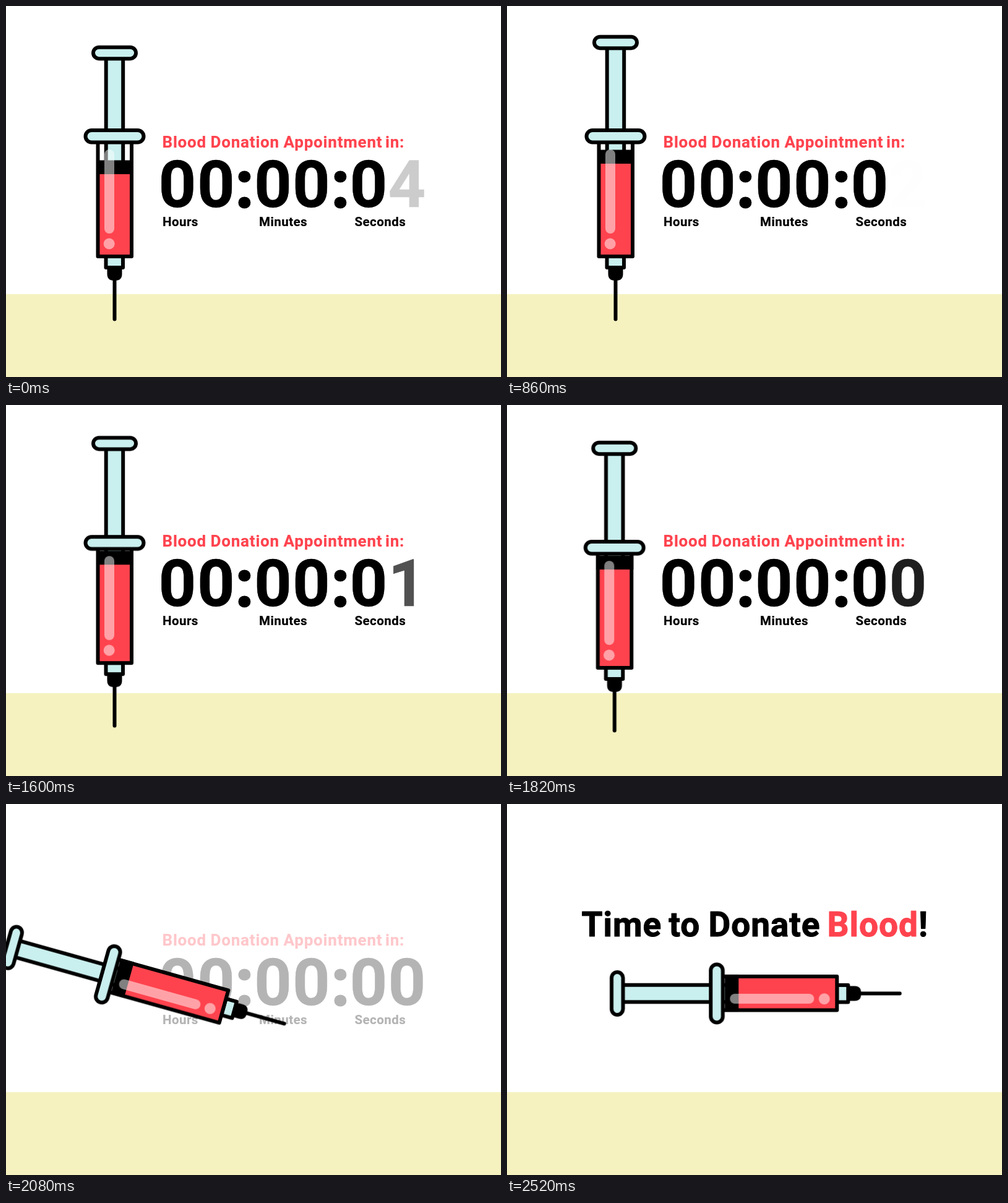
Write an HTML page that moves like this. It is 800 px wide and 600 px high and loops after 2820 ms.

```html
<!DOCTYPE html>
<html lang="en">
<head>
<meta charset="utf-8">
<title>Blood donation countdown</title>
<style>
  html, body { margin: 0; width: 100%; height: 100%; overflow: hidden; background: #fff; }
  svg { display: block; width: 800px; height: 600px; }
  text { font-family: Roboto, Arial, sans-serif; font-weight: 700; fill: #000; stroke: #000; stroke-linejoin: round; }
  .red { fill: #ff434e; stroke: #ff434e; }
  .head { font-size: 26px; letter-spacing: .8px; stroke-width: .2px; }
  .label { font-size: 20.5px; letter-spacing: .45px; stroke-width: .2px; }
  .clock { font-size: 106px; text-anchor: middle; stroke-width: .5px; }
  .colon { stroke-width: 3px; }
  .title { font-size: 55px; letter-spacing: .9px; stroke-width: 1px; }
  .line { stroke: #000; stroke-width: 6px; stroke-linejoin: round; }
  .glass { fill: #c9efee; }
</style>
</head>
<body>
<svg viewBox="0 0 800 600">
  <rect width="800" height="600" fill="#fff"/>
  <rect y="466" width="800" height="134" fill="#f5f2c0"/>

  <g id="countdown">
    <text class="head red" y="228.5"><tspan x="252.5">Blood</tspan> <tspan x="330.5">Donation</tspan> <tspan x="448.5">Appointment</tspan> <tspan x="613">in:</tspan></text>
    <g class="clock">
      <text x="277" y="324.5">0</text>
      <text x="339.5" y="324.5">0</text>
      <text x="385.5" y="324.5" class="colon">:</text>
      <text x="431.5" y="324.5">0</text>
      <text x="493.5" y="324.5">0</text>
      <text x="540.5" y="324.5" class="colon">:</text>
      <text x="586" y="324.5">0</text>
      <g id="digits"></g>
    </g>
    <g class="label">
      <text x="253" y="355.5">Hours</text>
      <text x="409" y="355.5">Minutes</text>
      <text x="563.5" y="355.5">Seconds</text>
    </g>
  </g>

  <text id="title" class="title" y="214"><tspan x="120.5">Time</tspan> <tspan x="261.5">to</tspan> <tspan x="325.5">Donate</tspan> <tspan class="red" x="517.5">Blood</tspan><tspan x="665">!</tspan></text>

  <g id="moveX"><g id="moveY"><g id="turn"><g transform="translate(-175.5 -273)">
    <rect x="172.5" y="436" width="6" height="73.5" rx="3"/>
    <rect class="line glass" x="161.5" y="405" width="27.5" height="18"/>
    <path d="M163.5 421H187.5V433Q187.5 444 177 444H174Q163.5 444 163.5 433Z"/>
    <rect x="148.5" y="222" width="54.5" height="183" fill="#ff434e"/>
    <g id="plunger">
      <rect x="149" y="222" width="53" height="30" fill="#fff"/>
      <rect class="line glass" x="161.7" y="80" width="27.5" height="175"/>
      <rect x="146" y="249.5" width="60" height="22.5"/>
      <rect class="line glass" x="141" y="66.7" width="69" height="18.5" rx="9.25"/>
    </g>
    <path class="line" fill="none" d="M148.5 219V405H203V219"/>
    <rect class="line glass" x="128.5" y="201" width="94" height="19.5" rx="9.75"/>
    <g fill="#fff" opacity=".5">
      <rect x="159" y="232" width="16" height="136" rx="8"/>
      <circle cx="166.7" cy="384.5" r="9"/>
    </g>
  </g></g></g></g>
</svg>
<script>
const LOOP = 2820;
const FADE = 140;
const SMOOTH = 'cubic-bezier(.33,0,.67,1)';
const byId = id => document.getElementById(id);

// Each step is [time, value, easing to the next step].
function track(el, prop, steps, format = v => v) {
  const first = steps[0], last = steps[steps.length - 1];
  const all = [...steps];
  if (first[0] > 0) all.unshift([0, first[1]]);
  if (last[0] < LOOP) all.push([LOOP, last[1]]);
  const frames = all.map(([time, value, easing = 'linear']) =>
    ({ offset: time / LOOP, [prop]: format(value), easing }));
  el.animate(frames, { duration: LOOP, iterations: Infinity });
}

const slide = axis => v => `translate${axis}(${v}px)`;

track(byId('moveX'), 'transform', [
  [1760, 175.5, SMOOTH],
  [1980, 166.4, 'cubic-bezier(.4,.25,.7,.64)'],
  [2160, 287, 'cubic-bezier(.333,.833,.667,1)'],
  [2520, 401.3]
], slide('X'));

track(byId('moveY'), 'transform', [
  [1466, 273, SMOOTH],
  [1754, 300, SMOOTH],
  [1980, 267.3, SMOOTH],
  [2150, 306.4]
], slide('Y'));

track(byId('turn'), 'transform', [
  [1906, 0, 'cubic-bezier(.5,0,.5,1)'],
  [2160, -90]
], v => `rotate(${v}deg)`);

track(byId('plunger'), 'transform', [
  [0, 0], [540, -11.5], [1200, -22.8], [1390, -26]
], slide('Y'));

track(byId('countdown'), 'opacity', [[1940, 1], [2140, 0]]);
track(byId('title'), 'opacity', [[2160, 0], [2334, 1]]);

// Digit, start and end of its stay.
const digits = [[4, -27, 491], [3, 491, 860], [2, 860, 1226], [1, 1226, 1697], [0, 1697, LOOP]];
for (const [digit, start, end] of digits) {
  const el = document.createElementNS('http://www.w3.org/2000/svg', 'text');
  el.setAttribute('x', 648);
  el.setAttribute('y', 324.5);
  el.textContent = digit;
  byId('digits').append(el);
  const steps = start < 0 ? [[0, -start / FADE]] : [[start, 0]];
  steps.push([start + FADE, 1]);
  if (end < LOOP) steps.push([end - FADE, 1], [end, 0]);
  track(el, 'opacity', steps);
}
</script>
</body>
</html>
```
